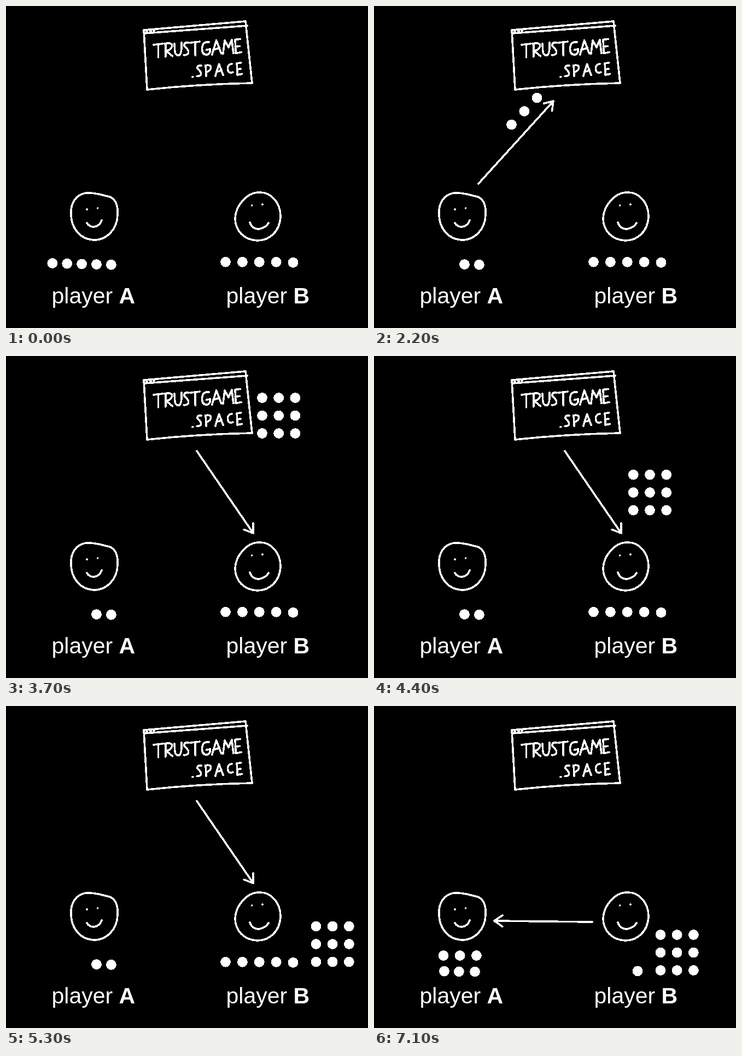
Animation, 662 px wide and 589 px high, one loop 8600 ms. Source, as an HTML page:

```html
<!DOCTYPE html>
<html lang="en">
<head>
<meta charset="utf-8">
<title>Trust game</title>
<style>
  html, body { margin: 0; width: 100%; height: 100%; overflow: hidden; background: #000; }
  svg { display: block; width: 100%; height: 100%; }
  .ink path { fill: none; stroke: #fff; stroke-width: 3.6; stroke-linecap: round; stroke-linejoin: round;
    vector-effect: non-scaling-stroke; }
  .ink, .solid { shape-rendering: crispEdges; }
  .solid, text { fill: #fff; }
  text { font: 41px "Liberation Sans", Arial, sans-serif; white-space: pre; }
  .bold { font-weight: bold; }
  .factor { font-size: 61px; }
</style>
</head>
<body>
<svg viewBox="0 0 662 589">
  <g class="ink" id="ink">
    <!-- browser window -->
    <path d="M258 153L252 44L438 28L450 141Q350 143 258 153M253 50L441 36M257 47h1M264 46h1M270 45h1"/>
    <!-- faces -->
    <path d="M146 342C165 341 175 346 190 349C203 355 205 370 204 383C203 408 185 428 161 428
      C137 427 119 408 119 380C118 360 128 345 146 342ZM148 397Q152 404 161 404Q172 402 175 392"/>
    <path d="M463 341C485 340 502 360 502 385C501 412 482 429 460 429
      C436 428 419 412 419 388C420 368 438 341 463 341ZM446 396Q450 408 463 408Q476 405 480 397"/>
    <path d="M148 372h.1M167.500 370h.1M449.500 365h.1M469 363h.1"/>
  </g>
  <text x="83.500" y="544">player <tspan class="bold">A</tspan></text>
  <text x="402.500" y="544">player <tspan class="bold">B</tspan></text>
  <text class="factor" id="factor" x="637" y="58" text-anchor="end">x3</text>
  <g class="solid" id="coins"></g>
</svg>
<script>
const LOOP = 8600, STEP = 100;
const $ = id => document.getElementById(id);

function add(parent, tag, attrs) {
  const el = document.createElementNS("http://www.w3.org/2000/svg", tag);
  for (const name in attrs) el.setAttribute(name, attrs[name]);
  return parent.appendChild(el);
}

// Hand lettering: width and strokes of each letter, 25 units high.
const GLYPHS = {
  T: [17, "M0 2L17 0M9 1V25"],
  R: [15, "M2 1V25M0 1Q15-2 14 6Q12 13 3 14L15 24"],
  U: [14, "M0 2L1 17Q3 25 9 23Q14 20 13 0"],
  S: [9, "M9 1Q0 0 1 7L8 15Q11 24 0 24"],
  G: [16, "M14 2Q2 0 1 14Q1 25 9 25Q16 25 16 15L9 16"],
  A: [17, "M0 26L8 0L17 24M2 17L14 14"],
  M: [19, "M0 26L3 1L10 14L16 0L19 25"],
  E: [11, "M9 0L0 1L1 26L11 24M0 14L8 13"],
  P: [13, "M1 2L2 25M0 2Q13-1 12 8Q9 15 2 16"],
  C: [12, "M10 1Q0 3 1 13Q3 23 12 19"],
  ".": [1, "M0 25h1"]
};
function letter(text, x, y, size, gap) {
  for (const ch of text) {
    const [width, d] = GLYPHS[ch], move = width * size + gap;
    add($("ink"), "path", { d, transform: `translate(${x} ${y}) scale(${size})` });
    x += move;
    y -= move * .057;
  }
}
letter("TRUSTGAME", 269.5, 69, 1, 3.2);
letter(".SPACE", 341, 108.5, .85, 7.4);

function arrow(x1, y1, x2, y2) {
  const back = Math.atan2(y1 - y2, x1 - x2);
  const barb = a => `${x2 + 18 * Math.cos(back + a)} ${y2 + 18 * Math.sin(back + a)}`;
  return add($("ink"), "path", { d: `M${x1} ${y1}L${x2} ${y2}M${barb(.6)}L${x2} ${y2}L${barb(-.6)}` });
}
const timed = [
  [arrow(191, 325, 328, 174), 500, 3500],
  [$("factor"), 2600, 3500],
  [arrow(349, 174, 452, 324), 3500, 5400],
  [arrow(399, 395, 220, 393), 5400, LOOP]
];

// Keys are [time, x, y]; two keys at one time make a jump.
function track(keys, t) {
  const i = keys.findLastIndex(key => key[0] <= t);
  const [t0, x0, y0] = keys[i], [t1, x1, y1] = keys[i + 1] || [t0 + 1, x0, y0];
  const k = (t - t0) / (t1 - t0);
  return [x0 + (x1 - x0) * k, y0 + (y1 - y0) * k];
}
const rest = (x, y, from, to) => [[from, x, y], [to, x, y]];
const settle = (x, y, dx, dy) => [[6600, x, y], [7100, x + dx, y + dy]];
const settleA = (x, y) => settle(x, y, -37, 12.5);
const settleB = (x, y) => settle(x, y, -43, 15.5);

const coins = [];
function coin(keys, from = 0) {
  const el = add($("coins"), "circle", { r: 9.4 });
  coins.push({ el, keys });
  timed.push([el, from, LOOP]);
}

// A grid cell on its way from the window to player B.
function delivery(col, row, from) {
  const dx = 30.2 * col, dy = 32.5 * row;
  return [...rest(475.5 + dx, 37 + dy, from, 3500), [3500, 470 + dx, 36.5 + dy],
    [4300, 464 + dx, 196.5 + dy], [5300, 567 + dx, 403 + dy], ...settleB(567 + dx, 403 + dy)];
}

for (let i = 0; i < 5; i++) {
  // Player A invests three coins, which are then tripled.
  const ax = 84.8 + 26.9 * i, ay = 470.5 + .7 * i;
  if (i < 3) {
    const out = 700 + 200 * i, top = 2300 + 100 * i;
    const qx = 180.5 + 23.3 * i, qy = 302 - 24.5 * i;
    coin([...rest(ax, ay, 0, out), ...rest(qx, qy, out, 1200),
      ...rest(qx + 71, qy - 85, 2200, top), ...delivery(i, 0, top)]);
    coin(delivery(i, 1, 0), 3100);
    coin(delivery(i, 2, 0), 3300);
  } else coin(settleA(ax, ay));

  // Player B gives four back.
  const bx = 401.5 + 30.9 * i, by = 468.3;
  if (i < 4) {
    const end = i ? [164 + 30.2 * (i - 1), 444] : [221.5, 473.5];
    coin([...rest(bx, by, 0, 5600), [5600, bx - 22, by + 6], [6500, bx - 222, by - 13],
      [6600, bx - 222, by - 13], ...settleA(...end)]);
  } else coin(settleB(bx, by + 1));
}

function draw(time) {
  const t = Math.floor(time % LOOP / STEP) * STEP;
  for (const [el, from, to] of timed)
    el.setAttribute("visibility", t >= from && t < to ? "visible" : "hidden");
  for (const { el, keys } of coins) {
    const [x, y] = track(keys, Math.max(t, keys[0][0]));
    el.setAttribute("cx", x);
    el.setAttribute("cy", y);
  }
}

const begin = performance.now();
function tick() {
  draw(performance.now() - begin);
  requestAnimationFrame(tick);
}
tick();
</script>
</body>
</html>
```
